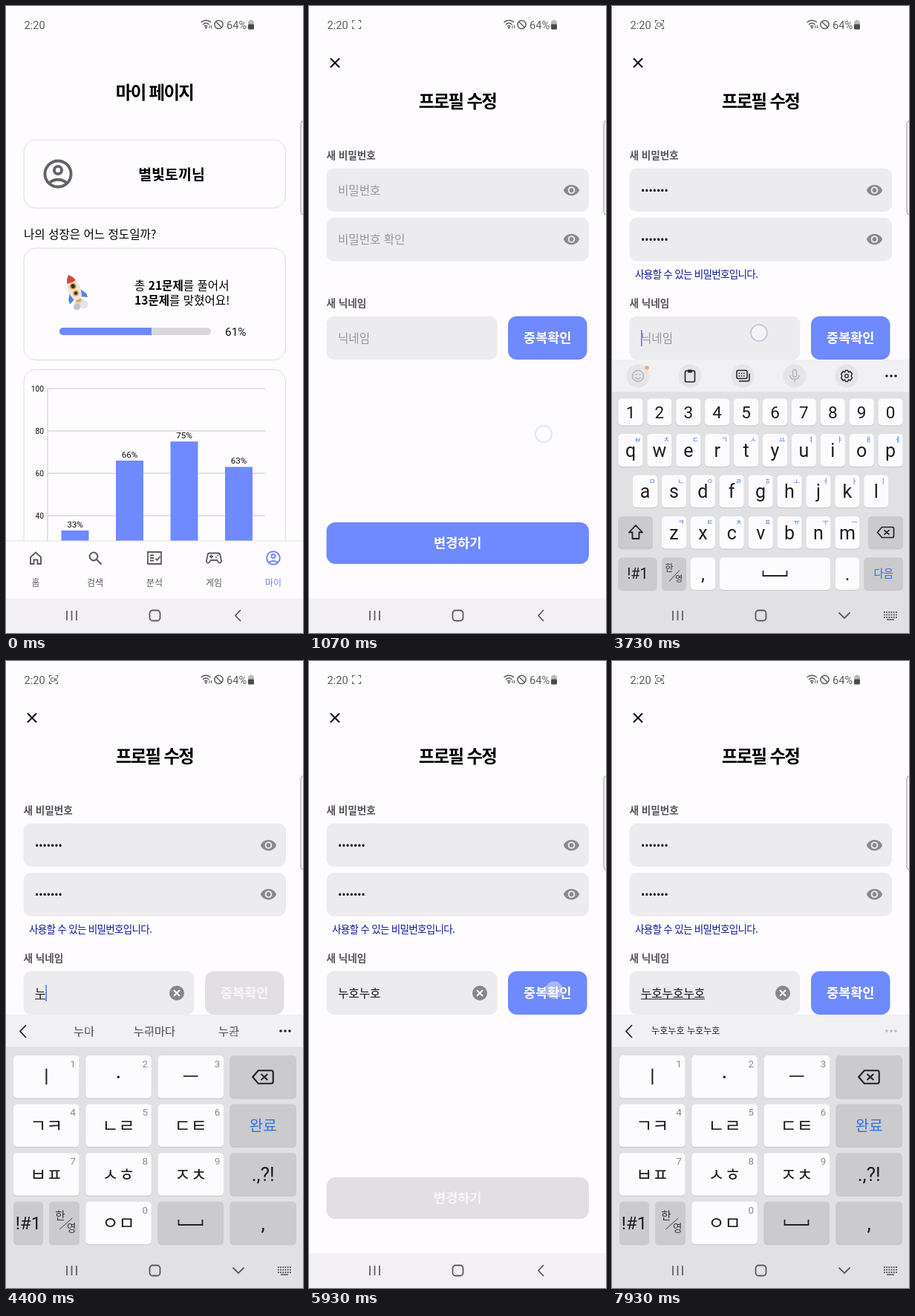
Write an HTML page that moves like this. It is 400x844 px and loops after 8 s.

```html
<!DOCTYPE html>
<html lang="ko">
<head>
<meta charset="utf-8">
<style>
html, body { margin: 0; width: 100%; height: 100%; overflow: hidden; background: #fefcff; }
svg { display: block; width: 100%; height: 100%; }
text { font-family: "Noto Sans CJK KR", "Noto Sans CJK JP", "Noto Sans CJK", sans-serif; white-space: pre; }
.r { font-family: Roboto, "Noto Sans CJK KR", sans-serif; }
.m { text-anchor: middle; }
.e { text-anchor: end; }
.b { font-weight: 700; }
</style>
</head>
<body>
<svg viewBox="0 0 400 844">
  <rect width="400" height="844" fill="#fefcff"/>
  <g id="home"></g>
  <g id="profile"></g>
  <g id="board"></g>
  <g id="bar"></g>
  <g id="status"></g>
  <g id="touch"></g>
</svg>
<script>
const BLUE = '#6f89ff', GREY = '#5b5a5e', BG = '#fefcff', DARK = '#cbcacd';
const LOOP = 8000;
const el = id => document.getElementById(id);
const clamp = v => Math.max(0, Math.min(1, v));
const ease = v => 1 - (1 - clamp(v)) ** 3;

// Drawing helpers; text is placed by its vertical centre
const text = (x, y, s, size, fill = '#000', cls = '', more = '') =>
  `<text x="${x}" y="${y + size * .36}" font-size="${size}" fill="${fill}" class="${cls}" ${more}>${s}</text>`;
const rect = (x, y, w, h, r, fill, more = '') =>
  `<rect x="${x}" y="${y}" width="${w}" height="${h}" rx="${r}" fill="${fill}" ${more}/>`;
const disc = (x, y, r, fill, more = '') => `<circle cx="${x}" cy="${y}" r="${r}" fill="${fill}" ${more}/>`;
const line = (d, color, w = 1.6, more = '') =>
  `<path d="${d}" fill="none" stroke="${color}" stroke-width="${w}" ${more}/>`;
const at = (x, y, s, body) => `<g transform="translate(${x} ${y}) scale(${s})">${body}</g>`;

const cache = {};
function put(id, html) {
  if (cache[id] !== html) el(id).innerHTML = cache[id] = html;
}

// Icons, each centred on its own origin
const person = c => disc(0, 0, 9, 'none', `stroke="${c}" stroke-width="2"`) +
  disc(0, -2.6, 2.6, 'none', `stroke="${c}" stroke-width="2"`) + line('M-6 6.3C-3 3.2 3 3.2 6 6.3', c, 2);
const eye = `<path fill="#8a898c" fill-rule="evenodd" d="M0-7.5C-5-7.5-9.3-4.4-11 0-9.3 4.4-5 7.5 0 7.5S9.3 4.4 11 0C9.3-4.4 5-7.5 0-7.5ZM0 5A5 5 0 1 1 0-5 5 5 0 0 1 0 5ZM0-3A3 3 0 1 0 0 3 3 3 0 0 0 0-3Z"/>`;
const clear = disc(0, 0, 10, '#878689') + line('M-4-4L4 4M4-4L-4 4', '#fff', 2);
const backspace = line('M-11 0L-5-7H9Q11-7 11-5V5Q11 7 9 7H-5Z M-2-3.2L5 3.2M5-3.2L-2 3.2', '#222', 1.7);
const dots = c => [-6, 0, 6].map(x => disc(376 + x, 498, 1.8, c)).join('');
const rocket = `<g transform="rotate(-22)">
  ${disc(0, 18, 7, '#d5d4d8')}${disc(-6, 22, 5, '#c4c3c8')}${disc(5, 23, 6, '#e3e2e6')}
  <path d="M-8-1L-14 9V15L-6 11ZM8-1L14 9V15L6 11Z" fill="#4d86e0"/>
  <path d="M0-26Q-10-15-9-1Q-8 8-5 13H5Q8 8 9-1Q10-15 0-26Z" fill="#e9e6e8"/>
  <path d="M0-26Q-5-21-7-15Q0-12 7-15Q5-21 0-26Z" fill="#d8483c"/>
  ${disc(0, -8, 4, '#2b3040', 'stroke="#e8a33c" stroke-width="2"')}
  ${disc(0, 3, 3.4, '#2b3040', 'stroke="#e8a33c" stroke-width="2"')}
  <path d="M-4 13H4L2 17H-2Z" fill="#e8a33c"/></g>`;

// Home page: a scrolling part and fixed tabs
const card = (y, h) => rect(24, y, 352.5, h, 16, BG, 'stroke="#dcdadf"');
function chart() {
  let s = '';
  for (let v = 0; v <= 100; v += 20) {
    const y = 800 - v * 2.85;
    s += line(`M56 ${y}H350`, '#c2c0c4', .9) + text(51, y, v, 10.2, '#111', 'r e');
  }
  s += line('M56 515V800', '#c2c0c4', .9);
  [33, 66, 75, 63].forEach((v, i) => {
    const x = 74.5 + i * 73.5, y = 800 - v * 2.85;
    s += rect(x, y, 37, 800 - y, 0, BLUE) + text(x + 18.5, y - 8.5, v + '%', 11.7, '#111', 'r m');
  });
  return s;
}
const tabs = [
  ['홈', line('M-7-1V8H-2.5V2.5H2.5V8H7V-1L0-7.5Z', GREY, 1.9)],
  ['검색', disc(-2, -2, 5.4, 'none', `stroke="${GREY}" stroke-width="2"`) + line('M2 2L8.5 8.5', GREY, 2.3)],
  ['분석', line('M-9-8H9V8H-9ZM-6-3.5H-1M-6 0H-1M-6 3.5H-1M1.5 1L3.5 3L7.5-2', GREY, 1.8)],
  ['게임', line('M-6-6.5H6Q8-6.5 8.5-4L10 4Q10 7 7 6.5L4 3H-4L-7 6.5Q-10 7-10 4L-8.5-4Q-8-6.5-6-6.5ZM-6-2H-1M-3.5-4.5V.5', GREY, 1.8) +
    disc(3, -1, 1, GREY) + disc(5.5, -3.5, 1, GREY)],
  ['마이', person(BLUE)],
];
el('home').innerHTML = `<g id="scroll">` +
  text(200, 117, '마이 페이지', 23.4, '#000', 'm b', 'letter-spacing="-1.6"') +
  card(180, 92) + at(70, 226, 1.95, person('#636266')) + text(223, 227, '별빛토끼님', 19.5, '#000', 'm b') +
  text(24, 307, '나의 성장은 어느 정도일까?', 15.6, '#000', '', 'font-weight="500"') +
  card(326, 150.5) + at(93, 384, .92, rocket) +
  text(173, 376, '총 <tspan class="b">21문제</tspan>를 풀어서', 15.6) +
  text(173, 396, '<tspan class="b">13문제</tspan>를 맞혔어요!', 15.6) +
  rect(72, 433, 204, 10, 5, '#d9d7da') + `<path d="M77 433H196V443H77A5 5 0 0 1 77 433Z" fill="${BLUE}"/>` +
  text(295, 438.5, '61%', 15.4, '#111', 'r') +
  card(489.5, 341) + chart() + '</g>' +
  rect(0, 0, 400, 40, 0, BG) + rect(0, 720, 400, 80, 0, BG) + line('M0 720H400', '#dfdde1', 1) +
  tabs.map(([name, icon], i) => at(40 + 80 * i, 743, i < 4 ? 1 : .98, icon) +
    text(40 + 80 * i, 777, name, 12, i < 4 ? GREY : BLUE, 'm')).join('');

// Profile form
const field = (y, w = 353.5) => rect(23.5, y, w, 58.5, 10, '#ecebee');
const button = (x, y, w, h, label, on) => rect(x, y, w, h, 12, on ? BLUE : '#e1dfe2') +
  text(x + w / 2, y + h / 2, label, 17.5, on ? '#fff' : '#f7f5f8', 'm b');
const caret = (x, y) => rect(x, y - 11, 1.6, 22, 0, '#5c7cf0');
const hidden = (word, n, open) => '•'.repeat(Math.max(0, n - open)) + (open ? word[n - 1] : '');

function profile(s) {
  let out = rect(0, 0, 400, 800, 0, BG) + line('M29 70.5L41 82.5M41 70.5L29 82.5', '#000', 2) +
    text(200, 128.5, '프로필 수정', 23.4, '#000', 'm b', 'letter-spacing="-1.6"') +
    text(23.5, 201, '새 비밀번호', 13.6, '#555358', 'b') + text(23.5, 400, '새 닉네임', 13.6, '#555358', 'b') +
    field(218.5) + field(285) + field(417.5, 230) +
    at(353.5, 248, .97, eye) + at(353.5, 314, .97, eye);
  s.pw.forEach((p, i) => {
    const y = 248 + 66 * i;
    out += p.n ? text(39, y + .5, hidden(WORD, p.n, p.open), 15.6, '#111', 'r')
      : text(39, y, ['비밀번호', '비밀번호 확인'][i], 15.6, '#99979b');
    if (s.focus === i && s.blink) out += caret(38.5 + (p.n - p.open) * 5.75 + p.open * 9, y);
  });
  if (s.pw[0].n) {
    const ok = s.pw[1].n === WORD.length;
    out += text(31, 361, ok ? '사용할 수 있는 비밀번호입니다.' : '비밀번호가 일치하지 않습니다.', 13.6,
      ok ? '#0a1a9c' : '#b3261e', '', 'letter-spacing="-.75"');
  }
  const w = s.nick.length * 14.33;
  out += s.nick ? text(39, 447, s.nick, 15.6, '#111') + at(230, 447, 1, clear) : text(39, 447, '닉네임', 15.6, '#99979b');
  if (s.composing) out += rect(39, 454.5, w, 1, 0, '#111');
  if (s.focus === 2 && s.blink) out += caret(39 + w, 447);
  return out + button(268, 417.5, 106.5, 58.5, '중복확인', s.nick.length !== 1) +
    button(23.5, 695, 353.5, 56, '변경하기', !s.nick);
}

// Keyboards; spots keeps the place where a finger meets each key
const spots = {};
function key(x, y, w, h, label, size, fill = '#fcfbfd', color = '#1d1d1f', name = label) {
  spots[name] = [x + w / 2 + 2, y + h / 2 + 11];
  return rect(x, y + 1, w, h, 5, '#c6c5c9') + rect(x, y, w, h, 5, fill) +
    text(x + w / 2, y + h / 2, label, size, color, 'r m');
}
const langKey = (x, y, k) => text(x + 13 * k - 3, y + 14, '한', 12 * k, '#333', 'm') +
  line(`M${x + 10 * k} ${y + 32}L${x + 24 * k} ${y + 17}`, '#444', 1) + text(x + 23 * k, y + 24 + 5 * k, '영', 11 * k, '#333', 'm');
const spaceMark = (x, y) => line(`M${x - 16} ${y - 4}V${y + 3}H${x + 16}V${y - 4}`, '#222', 1.8);

function qwerty() {
  let s = '';
  const rows = [
    [8.5, 528.5, 36, '1234567890', ''],
    [8.5, 576, 44, 'qwertyuiop', 'ㅂㅈㄷㄱㅅㅛㅕㅑㅐㅔ'],
    [28, 631.5, 43.5, 'asdfghjkl', 'ㅁㄴㅇㄹㅎㅗㅓㅏㅣ'],
    [67, 687, 43.5, 'zxcvbnm', 'ㅋㅌㅊㅍㅠㅜㅡ'],
  ];
  for (const [x0, y, h, keys, hints] of rows)
    [...keys].forEach((k, i) => {
      const x = x0 + 38.9 * i;
      s += key(x, y, 33, h, k, hints ? 25 : 22.5);
      if (hints) s += text(x + 26, y + 8, hints[i], 9.5, '#4a7fd8', 'm');
    });
  return s + key(8.5, 687, 46.5, 43.5, '', 1, DARK) +
    line('M32 699L23 708.5H27.5V717H36.5V708.5H41Z', '#222', 1.8, 'stroke-linejoin="round"') +
    key(345, 687, 47, 43.5, '', 1, DARK) + at(368.5, 708.5, 1, backspace) +
    key(8.5, 742.5, 52, 43.5, '!#1', 20, DARK) + key(67, 742.5, 33, 43.5, '', 1, DARK) + langKey(67, 742.5, 1) +
    key(106, 742.5, 33, 43.5, ',', 25) + key(145, 742.5, 149, 43.5, '', 1) + spaceMark(219.5, 764) +
    key(301, 742.5, 32, 43.5, '.', 25) + key(339.5, 742.5, 52.5, 43.5, '다음', 14.5, DARK, '#2f73e0');
}
function tenKey() {
  const labels = ['ㅣ', 'ㆍ', 'ㅡ', 'ㄱㅋ', 'ㄴㄹ', 'ㄷㅌ', 'ㅂㅍ', 'ㅅㅎ', 'ㅈㅊ', '', 'ㅇㅁ'];
  let s = '';
  labels.forEach((k, i) => {
    if (!k) return;
    const x = 10 + 97.3 * (i % 3), y = 531 + 65.6 * (i / 3 | 0);
    s += key(x, y, 88.5, 57.5, k === 'ㆍ' ? '' : k, 24, '#fcfbfd', '#1d1d1f', k) +
      text(x + 80, y + 11, (i + 1) % 11, 13.5, '#8c8b8f', 'r m');
    if (k === 'ㆍ') s += disc(x + 44, y + 29, 1.8, '#1d1d1f');
  });
  s += ['', '완료', '.,?!', ','].map((k, i) =>
    key(301.5, 531 + 65.6 * i, 89.5, 57.5, k, [1, 20, 26, 27][i], DARK, i === 1 ? '#2f73e0' : '#1d1d1f')).join('');
  return s + at(346, 560, 1.25, backspace) + key(10, 727.8, 40, 57.5, '!#1', 24, DARK) +
    key(58, 727.8, 41, 57.5, '', 1, DARK) + langKey(60, 733, 1.22) +
    key(204.6, 727.8, 88.5, 57.5, '', 1, DARK) + spaceMark(248.5, 756);
}
const tools = [35, 105, 176, 246, 316].map(x => disc(x, 498, 15.5, '#e5e4e7')).join('') +
  disc(35, 498, 7.5, 'none', 'stroke="#b6b5b9" stroke-width="1.5"') + line('M31 500Q35 504 39 500', '#b6b5b9', 1.4) +
  disc(32.5, 496, 1, '#b6b5b9') + disc(37.5, 496, 1, '#b6b5b9') + disc(47, 487, 2.8, '#f2a978') +
  rect(98.5, 491, 13, 15, 2, 'none', 'stroke="#222" stroke-width="1.6"') + rect(102, 489.5, 6, 4, 1, '#222') +
  rect(168, 490.5, 14, 11, 2, 'none', 'stroke="#222" stroke-width="1.5"') + line('M170.5 494.5H180M170.5 498H180', '#222', 1.5, 'stroke-dasharray="1.7 1.5"') +
  line('M171 505H183Q185 505 185 503V495', '#222', 1.5) +
  rect(243.5, 489.5, 5, 10, 2.5, 'none', 'stroke="#b6b5b9" stroke-width="1.4"') + line('M240 497Q240 502.5 246 502.5T252 497M246 503V506.5', '#b6b5b9', 1.4) +
  line('M314.5 490.5H317.5L318.5 493L321 492L323.5 495.5L322 498L323.5 500.5L321 504L318.5 503L317.5 505.5H314.5L313.5 503L311 504L308.5 500.5L310 498L308.5 495.5L311 492L313.5 493Z', '#222', 1.4, 'stroke-linejoin="round"') +
  disc(316, 498, 2.3, 'none', 'stroke="#222" stroke-width="1.3"') + dots('#222');
const layouts = [qwerty(), tenKey()];

// Script of the session
const WORD = 'happy12', NAME = '누호';
const STEPS = ['ㄴ', '느', '누', '눗', '눟', '누ㅎㆍ', NAME];
const KEYS = ['ㄴㄹ', 'ㅡ', 'ㆍ', 'ㅅㅎ', 'ㅅㅎ', 'ㆍ', 'ㅡ'];
const LAG = 60;
const pwTimes = [[1690, 1810, 1930, 2050, 2150, 2270, 2370], [2740, 2830, 2930, 3030, 3140, 3250, 3370]];
const nickTimes = [
  [4000, 4100, 4200, 4480, 4560, 4650, 4740],
  [4840, 4920, 5000, 5090, 5170, 5260, 5340],
  [6790, 6870, 6960, 7050, 7130, 7230, 7340],
];
const edits = nickTimes.flatMap((row, i) => row.map((t, j) => ({ t: t + LAG, s: NAME.repeat(i) + STEPS[j] })));
const touches = [
  [790, 316, 576, 230], [1250, 190, 250, 60], [2600, 365, 764, 60], [3690, 198, 440, 100],
  [5500, 348, 637, 60], [5860, 330, 443, 60], [6330, 170, 449, 60],
  ...pwTimes.flatMap(row => row.map((t, i) => [t, ...spots[WORD[i]], 60])),
  ...nickTimes.flatMap(row => row.map((t, i) => [t, ...spots[KEYS[i]], 60])),
];

function state(t) {
  const pw = pwTimes.map(row => {
    const past = row.filter(k => k + LAG <= t);
    return { n: past.length, open: past.length && t - past.at(-1) < (past.length === 7 ? 300 : 1500) ? 1 : 0 };
  });
  const done = edits.filter(e => e.t <= t);
  const shown = t > 6400 ? ease((t - 6400) / 260) : t > 5560 ? 1 - ease((t - 5560) / 220) : ease((t - 1320) / 270);
  const focus = t < 1300 || t > 5560 && t < 6380 ? -1 : t < 2650 ? 0 : t < 3720 ? 1 : 2;
  const marks = [1300, 2650, 3720, 6380, ...pwTimes.flat().map(k => k + LAG), ...edits.map(e => e.t)];
  const last = Math.max(0, ...marks.filter(k => k <= t));
  return {
    pw, done, shown, focus, nick: done.length ? done.at(-1).s : '',
    blink: (t - last) % 1000 < 500,
    composing: done.length > 0 && focus === 2 && !(t > 6380 && t < edits[14].t),
  };
}

const wordSets = [['누이', '누리마다', '누가'], ['누나', '누구마다', '누군']];
function suggestions(i) {
  if (i < 0) return '';
  if (i > 6) return text(53, 498, `${NAME}${NAME} ${NAME}${NAME}`, 12.1, '#222');
  return wordSets[(i + 1) % 2].map((w, j) => text([105, 200, 300][j], 498, w, 15.3, '#222', 'm')).join('');
}
function board(t, s) {
  if (!s.shown) return '';
  const i = s.done.length - 1;
  let top = tools;
  if (s.composing) {
    const mix = clamp((t - s.done[i].t - 60) / 160);
    top = line('M27 490L19 498.5L27 507', '#222', 1.8) + dots(i > 6 ? '#b9b8bc' : '#222') +
      `<g opacity="${1 - mix}">${suggestions(i - 1)}</g><g opacity="${mix}">${suggestions(i)}</g>`;
  }
  return `<g transform="translate(0 ${(1 - s.shown) * 330})">` + rect(0, 476.5, 400, 368, 0, '#e1e0e3') +
    rect(0, 476.5, 400, 43, 0, '#f1f0f2') + top + layouts[t > 3880 ? 1 : 0] + '</g>';
}
function bar(open) {
  let s = rect(0, 797.5, 400, 47, 0, open ? '#e1e0e3' : '#f3f1f4') + line('M82 814V827M88.5 814V827M95 814V827', GREY, 1.7) +
    rect(193.5, 813.5, 14, 14, 4, 'none', `stroke="${GREY}" stroke-width="1.8"`) +
    line(open ? 'M305.5 816.5L313 824L320.5 816.5' : 'M316 813L309 820.5L316 828', GREY, 1.8);
  if (open) for (let y = 816; y < 825; y += 3.5) s += line(`M366 ${y}H384`, GREY, 1.8, 'stroke-dasharray="1.8 1.4"');
  return s + (open ? line('M370 826H380', GREY, 1.6) : '');
}
function status(t) {
  let s = text(24.5, 25.5, '2:20', 14.6, GREY, 'r') + text(297, 25.5, '64%', 14.6, GREY, 'r') +
    line('M262.5 22Q269 16.5 276 22M265 25Q269 21 273.5 25M267 27.5Q269 25.5 271.5 27.5', GREY, 1.5) + disc(269.3, 29.3, 1.3, GREY) +
    line('M274 26V30M276.5 26V30', GREY, 1) +
    disc(286.5, 25, 5.6, 'none', `stroke="${GREY}" stroke-width="1.5"`) + line('M282.5 21L290.5 29', GREY, 1.5) +
    rect(326, 20, 8, 11.5, 1.5, '#bbb9bd') + rect(328, 18.7, 4, 2, 0, '#bbb9bd') + rect(326, 24.5, 8, 7, 1.5, '#4a494c') +
    rect(397, 154.5, 12, 126.5, 4, '#f6f4f7', 'stroke="#99979b"');
  if (t > 300) {
    s += line('M58.5 22.5V19.5H61.5M66.5 19.5H69.5V22.5M69.5 27.5V30.5H66.5M61.5 30.5H58.5V27.5', GREY, 1.1);
    const phase = t % 1600;
    if (phase < 850 || phase > 1180) s += rect(60.5, 22.8, 5, 4.6, 1, 'none', `stroke="${GREY}"`) + line('M65.5 25L68 23.3V27L65.5 25.3', GREY, 1);
  }
  return s;
}

function draw(t) {
  const s = state(t);
  const scroll = 140 * ease((t - 70) / 620);
  el('scroll').setAttribute('transform', `translate(0 ${-scroll})`);
  el('profile').setAttribute('opacity', clamp((t - 760) / 110));
  put('profile', profile(s));
  put('board', board(t, s));
  put('bar', bar(s.focus >= 0));
  put('status', status(t));
  put('touch', touches.map(([t0, x, y, hold]) => {
    const a = t < t0 ? 0 : 1 - clamp((t - t0 - hold) / 100);
    return a ? disc(x, y, 11, '#fff', `fill-opacity=".45" stroke="#b9c2dc" stroke-width="1.5" opacity="${a}"`) : '';
  }).join(''));
}
function frame() {
  draw(performance.now() % LOOP);
  requestAnimationFrame(frame);
}
frame();
</script>
</body>
</html>
```
